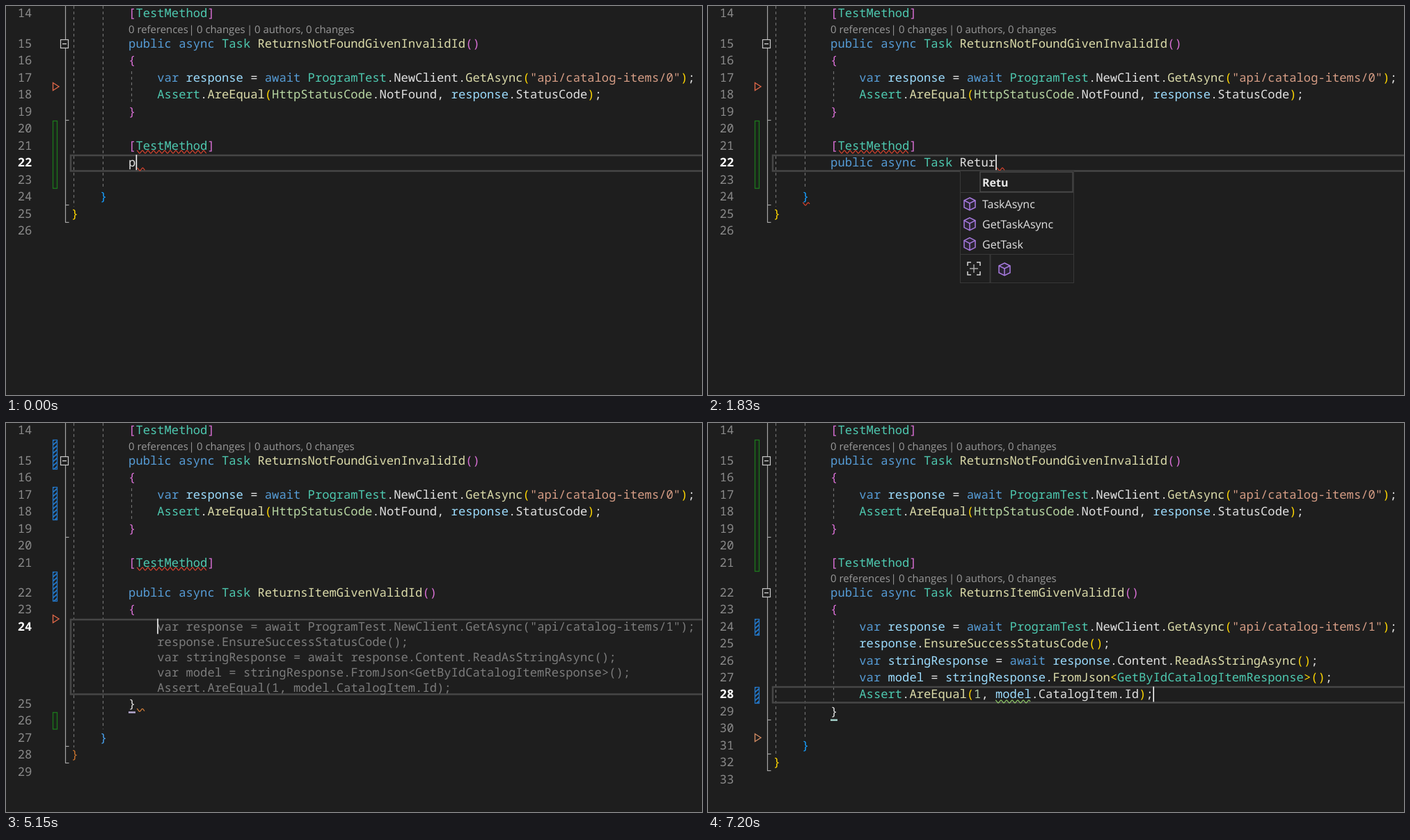
Write an HTML page with a canvas that moves like this. It is 1000 px wide and 560 px high and loops after 7.4 s.

```html
<!DOCTYPE html>
<html lang="en">
<head>
<meta charset="utf-8">
<title>Code completion</title>
<style>
html, body { margin: 0; width: 100%; height: 100%; overflow: hidden; background: #1e1e1e; }
canvas { display: block; width: 1000px; height: 560px; }
</style>
</head>
<body>
<canvas id="stage" width="1000" height="560"></canvas>
<script>
const ctx = document.getElementById('stage').getContext('2d');
const LOOP = 7400, CELL = 10.3, LEFT = 93.7, ROW = 24.45;
const FACE = '17.17px "Noto Sans Mono", "DejaVu Sans Mono", monospace';
const MONO = '500 ' + FACE;
const UI = '"Open Sans", "Noto Sans", sans-serif';
const BG = '#1e1e1e', WHITE = '#e2e2e2', PINK = '#da70d6', GOLD = '#ffd700', BLUE = '#179fff',
  RED = '#e5452f', GREEN = '#95d36b', LINE = '#a5a5a5', SAND = '#e8c98c', SKY = '#55aaff';

// Moments of the loop
const INSERT = 4810, GHOST = 5080, SETTLE = 5960, ACCEPT = 6520, COLOUR = 6590;

const METHOD = 'public async Task ReturnsItemGivenValidId()';
const NAME_AT = 18;
// start, end, first length, last length
const RUNS = [
  [0, 0, 1, 1], [70, 470, 2, 6], [610, 610, 7, 7], [740, 740, 9, 9], [870, 1000, 11, 12],
  [1130, 1130, 13, 13], [1270, 1340, 14, 15], [1480, 1620, 16, 18], [1690, 1690, 20, 20],
  [1760, 1830, 22, 23], [1970, 2110, 24, 25], [2240, 2240, 26, 26], [2380, 3060, 27, 34],
  [3130, 3680, 35, 41], [4070, 4070, 43, 43]
];

const BODY = [
  'var response = await ProgramTest.NewClient.GetAsync("api/catalog-items/1");',
  'response.EnsureSuccessStatusCode();',
  'var stringResponse = await response.Content.ReadAsStringAsync();',
  'var model = stringResponse.FromJson<GetByIdCatalogItemResponse>();',
  'Assert.AreEqual(1, model.CatalogItem.Id);'
];

const GROUPS = [
  ['#569cd6', 'public async var await'],
  ['#4ec9b0', 'Task TestMethod ProgramTest Assert GetByIdCatalogItemResponse'],
  ['#b8d7a3', 'HttpStatusCode'],
  ['#9cdcfe', 'response stringResponse model']
];
const PAINT = {};
for (const [color, words] of GROUPS) for (const w of words.split(' ')) PAINT[w] = color;

const LISTS = {
  p: [['key', 'params'], ['key', 'partial'], ['key', 'private'], ['key', 'protected'], ['key', 'public'],
    ['class', 'ProgramTest'], ['snip', 'prop'], ['snip', 'propfull'], ['snip', 'propg']],
  a: [['key', 'abstract'], ['key', 'async'], ['space', 'Analyzer'], ['class', 'ApiTokenHelper'], ['snip', 'Applier'],
    ['space', 'Archive'], ['class', 'AssemblyCleanupAttribute'], ['class', 'AssemblyInitializeAttribute'], ['class', 'Assert']],
  t: [['class', 'Task'], ['class', 'TaskFactory'], ['class', 'TaskScheduler'], ['class', 'TestClass'], ['class', 'TestContext'],
    ['class', 'TestMethod'], ['class', 'Tuple'], ['class', 'Type'], ['class', 'Types']]
};

const col = i => LEFT + i * CELL;

function lengthAt(t) {
  let n = 0;
  for (const [a, b, from, to] of RUNS) {
    if (t < a) break;
    const k = b > a ? Math.min(1, (t - a) / (b - a)) : 1;
    n = from + Math.floor((to - from) * k + 1e-6);
  }
  return n;
}

function rowY(n, t) {
  if (n === 14) return 10.3;
  const lens = t >= INSERT && n >= 22 ? 18.6 : 0;
  const ghost = t >= GHOST && t < ACCEPT && n >= 25 ? 86.7 : 0;
  return 54 + (n - 15) * ROW + lens + ghost;
}

function label(s, x, y, color, font) {
  ctx.font = font;
  ctx.fillStyle = color;
  ctx.fillText(s, x, y);
}

function box(x, y, w, h, fill, stroke, width = 1) {
  if (fill) { ctx.fillStyle = fill; ctx.fillRect(x, y, w, h); }
  if (stroke) { ctx.strokeStyle = stroke; ctx.lineWidth = width; ctx.strokeRect(x, y, w, h); }
}

function path(points, color, width = 1, close = false, fill) {
  ctx.beginPath();
  points.forEach(([x, y], i) => i ? ctx.lineTo(x, y) : ctx.moveTo(x, y));
  if (close) ctx.closePath();
  if (fill) { ctx.fillStyle = fill; ctx.fill(); }
  if (color) { ctx.strokeStyle = color; ctx.lineWidth = width; ctx.stroke(); }
}

function squiggle(x1, x2, y, color) {
  const points = [];
  for (let x = x1; x <= x2; x++) points.push([x, y - 2 * Math.cos((x - x1) * Math.PI / 4)]);
  path(points, color, 1.15);
}

// One line of code, coloured by token; brackets take the given colour.
function code(s, c, y, bracket, flat) {
  const tokens = /"[^"]*"|[A-Za-z]\w*|\d+|[^\sA-Za-z\d"]/g;
  for (let m; (m = tokens.exec(s));) {
    const w = m[0], next = s[m.index + w.length], dotted = s[m.index - 1] === '.';
    let color = WHITE;
    if (w[0] === '"') color = '#d69d85';
    else if (/\d/.test(w[0])) color = '#b5cea8';
    else if (/^[()[\]{}<>]$/.test(w)) color = bracket;
    else if (PAINT[w] && !dotted) color = PAINT[w];
    else if (/^\w/.test(w) && (next === '(' || next === '<')) color = '#dcdcaa';
    label(w, col(c + m.index), y + 6, flat || color, MONO);
  }
}

function codeLens(y, alpha) {
  ctx.globalAlpha = alpha;
  const parts = [['0 references', 176], ['|', 262.5], ['0 changes', 274], ['|', 346], ['0 authors,', 357], ['0 changes', 431]];
  for (const [s, x] of parts) label(s, x, y + 5.5, '#999999', '14.9px ' + UI);
  ctx.globalAlpha = 1;
}

function dashed(x, y1, y2) {
  ctx.setLineDash([4, 4]);
  path([[x, y1], [x, y2]], '#707070', 1.2);
  ctx.setLineDash([]);
}

function foldBox(y) {
  box(78.5, y - 5.5, 11, 12, BG, '#c8c8c8', 1.2);
  path([[81, y + .5], [87, y + .5]], '#d8d8d8', 1.3);
}

function greenBar(y1, y2) { box(67.5, y1 + .5, 6, y2 - y1, '#1b241b', '#1c771c', 1.3); }

function blueBar(y1, y2) {
  ctx.save();
  ctx.beginPath();
  ctx.rect(67, y1, 7, y2 - y1);
  ctx.clip();
  for (let y = y1; y < y2 + 10; y += 6) path([[67, y + 2], [74, y - 4]], '#2375c4', 2);
  ctx.restore();
  box(67.5, y1 + .5, 6, y2 - y1 - 1, null, '#2375c4', 1.3);
}

function margin(t) {
  const ends = t < INSERT ? [24, 25] : t < ACCEPT ? [27, 28] : [29, 31, 32];
  const ticks = [19, ...ends].map(n => Math.round(rowY(n, t) + 12) + .5);
  path([[85.5, 0], [85.5, ticks[ticks.length - 1]]], LINE, 1.2);
  for (const y of ticks) path([[85, y], [90.5, y]], LINE, 1.2);
  foldBox(54);
  if (t >= ACCEPT) foldBox(244);

  if (t < INSERT) greenBar(165, 262);
  else if (t < ACCEPT) {
    blueBar(24, 67); blueBar(92, 140); blueBar(214, 257);
    const y = rowY(26, t);
    greenBar(y - 12, y + 12);
  } else {
    greenBar(24, 213); blueBar(282, 306); blueBar(380, 404);
  }
  const y = t < INSERT ? 116 : t < ACCEPT ? 282 : 453;
  path([[67.5, y - 5.5], [76, y], [67.5, y + 5.5]], t < ACCEPT ? '#dd6748' : '#d08a62', 1.4, true);

  const last = t < INSERT ? 25 : t < ACCEPT ? 28 : 32;
  dashed(97.5, 0, rowY(last, t) - 10);
  dashed(139.5, 0, rowY(last - 1, t) - 12);
  dashed(180.5, 94, 140);
  if (t >= ACCEPT) dashed(180.5, 284, 403);
}

function caret(x, y) { box(x, y - 11, 1.6, 22, '#f5f5f5'); }

const icons = {
  key(x, y) {
    box(x - 9, y - 8, 10, 4, null, SKY, 2);
    for (const [a, b, dy] of [[4, 10, -6], [-10, 1, 0], [4, 10, 0], [-10, 10, 4], [-10, 5, 8]])
      path([[x + a, y + dy], [x + b, y + dy]], '#d0d0d0', 1.6);
  },
  space(x, y) { label('{ }', x - 10, y + 6, '#d8d8d8', '17px ' + UI); },
  class(x, y) {
    const diamond = (dx, dy, r) => path([[x + dx - r, y + dy], [x + dx, y + dy - r], [x + dx + r, y + dy], [x + dx, y + dy + r]], SAND, 1.5, true);
    path([[x - 2, y - 2], [x + 3, y - 2]], SAND, 1.5);
    path([[x - 1, y - 2], [x - 1, y + 6], [x + 3, y + 6]], SAND, 1.5);
    diamond(-5, -4, 5); diamond(6, -1, 3.5); diamond(6, 6, 3.5);
  },
  snip(x, y) {
    path([[x - 8, y + 7], [x - 8, y - 8], [x + 8, y - 8], [x + 8, y + 7]], '#cfcfcf', 1.6);
    ctx.setLineDash([2, 2]);
    path([[x - 8, y + 8], [x + 9, y + 8]], '#cfcfcf', 2);
    ctx.setLineDash([]);
  },
  expand(x, y) {
    for (const a of [-1, 1]) for (const b of [-1, 1])
      path([[x + a * 4, y + b * 9], [x + a * 9, y + b * 9], [x + a * 9, y + b * 4]], '#d8d8d8', 1.5);
    path([[x - 6, y], [x + 6, y]], '#a8a8a8', 1.5);
    path([[x, y - 6], [x, y + 6]], '#a8a8a8', 1.5);
  },
  struct(x, y) { box(x - 3, y - 8, 13, 11, SKY); box(x - 10, y - 2, 13, 11, '#3c97ef', BG); },
  link(x, y) {
    for (const [dx, r] of [[-7, 3], [6, 4]]) {
      ctx.beginPath();
      ctx.arc(x + dx, y, r, 0, 7);
      ctx.strokeStyle = SKY; ctx.lineWidth = 1.6; ctx.stroke();
    }
    path([[x - 4, y], [x + 2, y]], SKY, 1.6);
  },
  list(x, y) {
    box(x - 2, y - 8, 11, 10, BG, SAND, 1.5);
    box(x - 9, y - 1, 10, 9, BG, SAND, 1.5);
    for (const [dx, dy] of [[1, -5], [1, -2], [-7, 2], [-7, 5]]) path([[x + dx, y + dy], [x + dx + 6, y + dy]], SAND, 1.2);
  },
  bag(x, y) {
    box(x - 9, y - 5, 18, 13, null, '#9b6fd0', 1.6);
    box(x - 4, y - 8, 8, 3, null, '#9b6fd0', 1.6);
    for (const dx of [-5, 5]) path([[x + dx, y - 5], [x + dx, y + 8]], '#9b6fd0', 1.4);
  },
  cube(x, y) {
    const c = '#a87be0';
    path([[x, y - 9], [x + 8, y - 5], [x + 8, y + 5], [x, y + 9], [x - 8, y + 5], [x - 8, y - 5]], c, 1.5, true, '#2a2433');
    path([[x - 8, y - 5], [x, y - 1], [x + 8, y - 5]], c, 1.5);
    path([[x, y - 1], [x, y + 9]], c, 1.5);
  }
};

function completion(x, w, items, picked) {
  const right = x + w, bar = right - 26;
  box(x + .5, 237.5, w - 1, 289, '#1f1f1f', '#383838');
  ctx.save();
  ctx.beginPath();
  ctx.rect(x, 238, w, 247);
  ctx.clip();
  items.forEach(([kind, name], i) => {
    const y = 254 + i * 28.75;
    if (i === picked) box(x + 28, y - 15, bar - x - 28, 28.5, '#3d3d3d');
    icons[kind](x + 14, y);
    const bold = '700 16.2px ' + UI;
    label(name[0], x + 31, y + 6, '#f0f0f0', bold);
    label(name.slice(1), x + 31 + ctx.measureText(name[0]).width, y + 6, WHITE, '16.2px ' + UI);
  });
  box(bar, 238, 25, 247, '#2e2e2e');
  box(bar + 6, 263, 13, 11, '#4d4d4d');
  const m = bar + 12.5;
  path([[m - 6, 254], [m, 247], [m + 6, 254]], null, 0, true, '#999999');
  path([[m - 6, 469], [m, 476], [m + 6, 469]], null, 0, true, '#999999');
  ctx.restore();
  path([[x, 485.5], [right, 485.5]], '#383838');
  path([[x + 42.5, 487], [x + 42.5, 526]], '#383838', 2);
  icons.expand(x + 20, 506);
  ['space', 'class', 'struct', 'link', 'list', 'bag', 'key', 'snip'].forEach((kind, i) => {
    const ix = x + 64 + i * 40.5;
    if (ix < right - 12) icons[kind](ix, 506);
  });
}

function namePopup(name) {
  const bold = '700 16px ' + UI;
  ctx.font = bold;
  const right = Math.max(525, Math.round(394 + ctx.measureText(name).width + 17));
  box(362.5, 237.5, right - 362, 161, '#1f1f1f', '#383838');
  box(391, 239, right - 392, 28.5, '#1f1f1f', '#4a4a4a', 1.4);
  path([[363, 268.5], [right, 268.5]], '#3a3a3a');
  label(name, 394, 260, '#e8e8e8', bold);
  ['TaskAsync', 'GetTaskAsync', 'GetTask'].forEach((s, i) => {
    const y = 285 + i * 28.8;
    icons.cube(376, y);
    label(s, 394, y + 6, WHITE, '16px ' + UI);
  });
  path([[363, 357.5], [right, 357.5]], '#383838');
  path([[405.5, 358], [405.5, 398]], '#383838', 2);
  icons.expand(382, 378);
  icons.cube(426, 379);
}

function typingPart(t) {
  const n = lengthAt(t), y = rowY(22, t), end = col(8 + n), caretAt = t >= 4070 && t < 4410 ? n - 1 : n;
  if (t >= 3790 && t < 4000) box(361.5, 214, 238, 23, '#3d6f12', '#4d8420');
  code(METHOD.slice(0, n), 8, y, PINK);
  squiggle(end + 2, end + 13, 235, RED);
  code('}', 4, rowY(24, t), BLUE);
  if (t >= 200) squiggle(136, 146, 285, RED);
  code('}', 0, rowY(25, t), GOLD);
  caret(col(8 + caretAt) + .2, y);

  if (t >= 70 && t < 610) completion(177, 368, LISTS.p, t < 270 ? 0 : 4);
  if (t >= 740 && t < 1130) completion(249, 368, LISTS.a, 1);
  if (t >= 1270 && t < 1620) completion(311, 258, LISTS.t, 0);
  const name = METHOD.slice(NAME_AT, lengthAt(t - 70));
  if (name && t < 4000) namePopup(name);
}

function methodPart(t) {
  const done = t >= ACCEPT;
  code(METHOD, 8, rowY(22, t), PINK);
  code('{', 8, rowY(23, t), PINK);
  const first = rowY(24, t);
  if (t >= GHOST) BODY.forEach((s, i) => {
    const y = done ? rowY(24 + i, t) : first + (i ? .8 + i * 22 : 0);
    code(s, 12, y, GOLD, done ? (t < COLOUR && WHITE) : '#7c7c7c');
  });
  const end = done ? 29 : 25;
  code('}', 8, rowY(end, t), WHITE);
  box(176, rowY(end, t) + 11.5, 10, 2.5, done ? '#a5d2cb' : '#b5a9cf');
  code('}', 4, rowY(end + 2, t), done ? BLUE : '#4aa3f0');
  code('}', 0, rowY(end + 3, t), done ? GOLD : '#c9742f');

  if (t >= GHOST && t < 5280) squiggle(188, 199, rowY(25, t) + 9.5, '#d9823b');
  if (t >= SETTLE && !done) squiggle(362, 598, 254.5, GREEN);
  if (t >= 6730) squiggle(413, 463, 401, GREEN);
  if (t >= SETTLE) codeLens(223.5, Math.min(1, (t - SETTLE) / 800));

  const blinkOff = (t >= 5480 && t < SETTLE) || (t >= 6800 && t < 7200);
  if (!blinkOff) done ? caret(639.4, rowY(28, t)) : caret(217.2, first);
}

function draw(t) {
  box(0, 0, 1000, 560, BG);
  margin(t);

  const ghost = t >= GHOST && t < ACCEPT;
  const active = t < INSERT ? 22 : t < ACCEPT ? 24 : 28;
  const last = t < INSERT ? 26 : t < ACCEPT ? 29 : 33;
  box(93, Math.round(rowY(active, t)) - 10, 920, ghost ? 107.5 : 22.5, null, '#464646', 2.5);
  for (let n = 14; n <= last; n++) {
    const on = n === active;
    label(n, 16.8, rowY(n, t) + 6, on ? '#ffffff' : '#8a8a8a', on ? '600 ' + FACE : FACE);
  }

  code('[TestMethod]', 8, rowY(14, t), PINK);
  codeLens(33, 1);
  code('public async Task ReturnsNotFoundGivenInvalidId()', 8, rowY(15, t), PINK);
  code('{', 8, rowY(16, t), PINK);
  code(BODY[0].replace('/1', '/0'), 12, rowY(17, t), GOLD);
  code('Assert.AreEqual(HttpStatusCode.NotFound, response.StatusCode);', 12, rowY(18, t), GOLD);
  code('}', 8, rowY(19, t), PINK);
  code('[TestMethod]', 8, rowY(21, t), PINK);
  if (t < SETTLE) squiggle(188, 288, 210, RED);

  if (t < INSERT) typingPart(t);
  else methodPart(t);
}

ctx.textRendering = 'geometricPrecision';
const start = performance.now();
function tick() {
  draw((performance.now() - start) % LOOP);
  requestAnimationFrame(tick);
}
tick();
</script>
</body>
</html>
```
